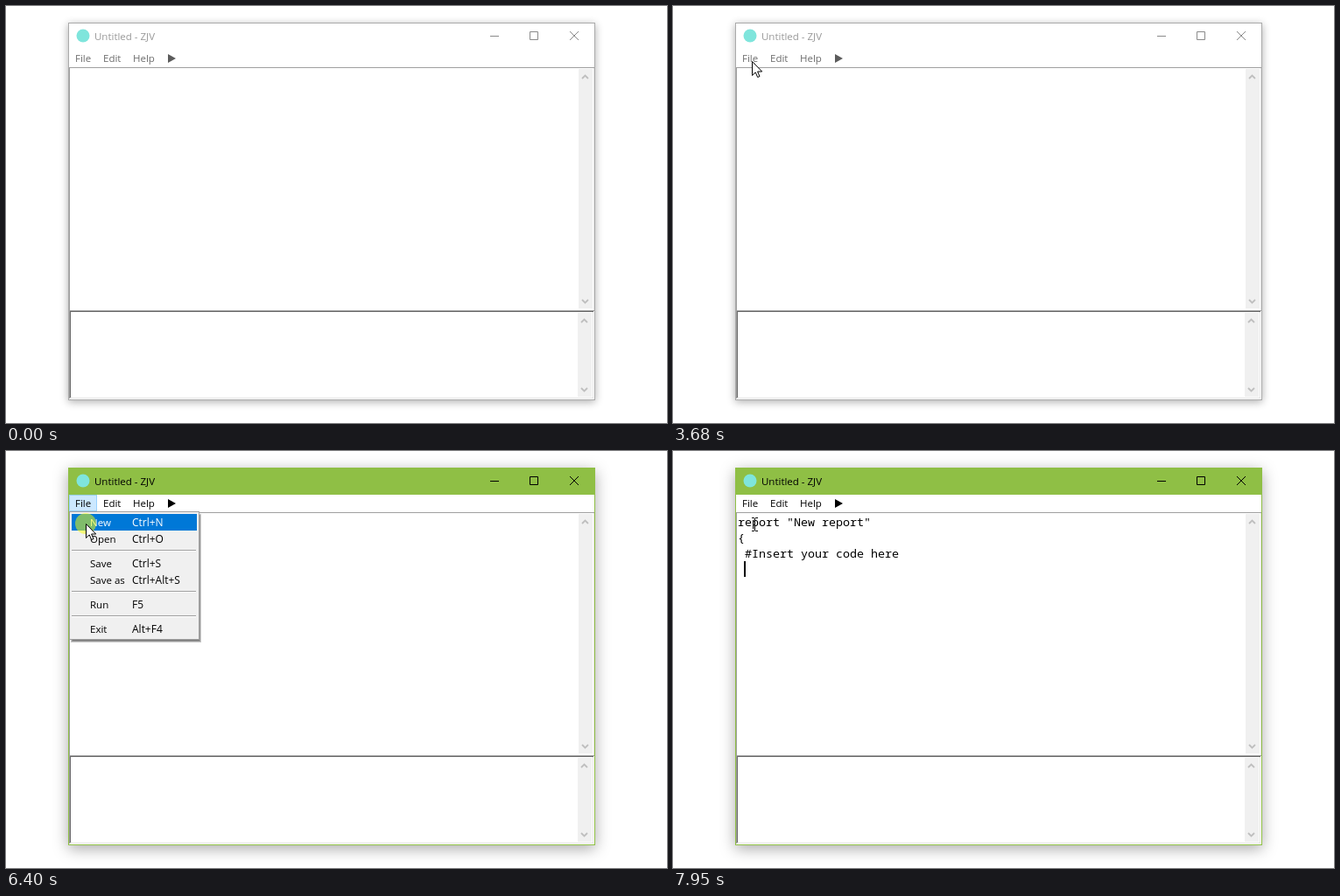
Recreate the animation shown at these times as an HTML page. Size 755x477 px, loop 8000 ms.

```html
<!DOCTYPE html>
<html lang="en">
<head>
<meta charset="utf-8">
<title>Editor demo</title>
<style>
html, body { margin: 0; width: 100%; height: 100%; overflow: hidden; background: #fff; }
#win, #win * { box-sizing: border-box; }
#win { position: absolute; left: 71px; top: 19px; width: 602px; height: 432px; background: #fff;
  box-shadow: 0 2px 9px rgba(0,0,0,.32); }
#win.active { box-shadow: 0 4px 16px rgba(0,0,0,.34); }
svg { position: absolute; left: 0; top: 0; display: block; }
text { font: 11.5px "Open Sans", "Noto Sans", sans-serif; white-space: pre; }
.keys text { font-size: 12px; }
#code text { font: 13.33px "Noto Sans Mono", "DejaVu Sans Mono", monospace; }
rect { shape-rendering: crispEdges; }
.title { fill: #999; }
.icon { stroke: #8a8a8a; fill: none; }
.bar { fill: #6d6d6d; }
.play { fill: #5c5c5c; }
.frame { fill: none; stroke: #aaa; shape-rendering: crispEdges; }
.caption { fill: #fff; }
.active .title, .active .bar, .active .play { fill: #000; }
.active .icon { stroke: #000; }
.active .frame { stroke: #8fbf45; }
.active .caption { fill: #8fbf45; }
</style>
</head>
<body>
<div id="win"></div>
<svg id="stage" width="755" height="477" viewBox="0 0 755 477">
  <rect class="caption" x="72" y="20" width="600" height="30"/>
  <rect class="frame" x="71.5" y="19.5" width="601" height="431"/>
  <circle cx="88" cy="34" r="7.5" fill="#7fe5dc"/>
  <text class="title" x="101" y="39">Untitled - ZJV</text>
  <path class="icon" d="M553 34.5h10M598.5 29.5h9v9h-9zM644 29l10 10M654 29l-10 10"/>

  <g id="hot"><rect x="72.5" y="50.5" width="31" height="18" fill="#cce8ff" stroke="#99d1ff"/></g>
  <g class="bar">
    <text x="79" y="64">File</text><text x="111" y="64">Edit</text><text x="145" y="64">Help</text>
  </g>
  <path class="play" d="M185 55l9 5-9 5z"/>

  <g id="panes"></g>

  <g id="code">
    <text x="74" y="86">report "New report"</text>
    <text x="74" y="104">{</text>
    <text x="82" y="122">#Insert your code here</text>
  </g>
  <rect id="caret" x="81" y="126" width="2" height="18"/>

  <g id="menu"></g>
  <g id="pick">
    <rect x="75" y="72" width="143" height="19" fill="#0078d7"/>
    <g fill="#fff"><text x="96" y="86">New</text><g class="keys"><text x="144" y="86">Ctrl+N</text></g></g>
  </g>

  <circle id="click" r="12" fill="#ff0" fill-opacity=".5"/>
  <path id="arrow" d="M.5.5v16l3.7-3.6 2.5 5.6 2.3-1-2.4-5.5h5.1z" fill="#fff" stroke="#000"/>
  <path id="beam" d="M-3-7.5h3M1-7.5h3M.5-7v14M-3 7.5h3M1 7.5h3" stroke="#000" shape-rendering="crispEdges"/>
</svg>
<script>
const LOOP = 8000;
const $ = id => document.getElementById(id);
const rect = (x, y, w, h, fill) =>
  `<rect x="${x}" y="${y}" width="${w}" height="${h}" fill="${fill}"/>`;
const label = (x, y, s) => `<text x="${x}" y="${y}">${s}</text>`;

// Scroll bar with a chevron at each end
const scrollbar = (x, y, h, up, down) => {
  const mid = x + 7.5;
  return rect(x, y, 16, h, '#f0f0f0') +
    `<path d="M${mid - 3.5} ${up + 2}l3.5-3.5 3.5 3.5M${mid - 3.5} ${down - 2}l3.5 3.5 3.5-3.5"
      fill="none" stroke="#bfbfbf" stroke-width="1.8"/>`;
};

$('panes').innerHTML =
  rect(72, 70, 600, 1, '#a0a0a0') + rect(72, 70, 1, 278, '#a0a0a0') +
  rect(671, 71, 1, 277, '#e3e3e3') +
  rect(72, 348, 600, 1, '#a0a0a0') + rect(73, 349, 598, 1, '#696969') +
  rect(72, 348, 1, 101, '#a0a0a0') + rect(73, 349, 1, 99, '#696969') +
  rect(670, 350, 1, 98, '#e3e3e3') + rect(74, 448, 597, 1, '#e3e3e3') +
  scrollbar(654, 72, 274, 81, 338) + scrollbar(653, 351, 96, 360, 439);

const items = [
  [86, 'New', 'Ctrl+N'], [105, 'Open', 'Ctrl+O'], [133, 'Save', 'Ctrl+S'],
  [152, 'Save as', 'Ctrl+Alt+S'], [180, 'Run', 'F5'], [208, 'Exit', 'Alt+F4']
];
$('menu').innerHTML =
  [1, 2, 3].map(i => `<rect x="${77 - i}" y="${75 - i}" width="${143 + 2 * i}" height="${141 + 2 * i}"
    rx="1" fill="#000" fill-opacity=".22"/>`).join('') +
  rect(72, 69, 149, 147, '#a0a0a0') + rect(73, 70, 147, 145, '#f0f0f0') +
  [113, 160, 188].map(y => rect(75, y, 142, 1, '#a0a0a0') + rect(75, y + 1, 142, 1, '#fff')).join('') +
  items.map(([y, name]) => label(96, y, name)).join('') +
  '<g class="keys">' + items.map(([y, , key]) => label(144, y, key)).join('') + '</g>';

// Pointer moves: first step, last step, step count, target, easing
const linear = p => p;
const smooth = p => p * p * (3 - 2 * p);
const moves = [
  [1260, 1290, 2, 452, 225, linear],
  [2070, 2070, 1, 449, 225, linear],
  [2150, 2610, 7, 249, 169, smooth],
  [2910, 3680, 11, 90, 63, smooth],
  [5320, 5780, 7, 91, 83, linear],
  [6630, 6630, 1, 93, 84, linear]
];

function pointer(t) {
  let x = 462, y = 241;
  for (const [from, to, n, tx, ty, ease] of moves) {
    if (t < from) break;
    const gap = (to - from) / (n - 1 || 1) || 1;
    const p = ease(Math.min(n, Math.floor((t - from) / gap + 1e-6) + 1) / n);
    x = Math.round(x + (tx - x) * p);
    y = Math.round(y + (ty - y) * p);
  }
  return [x, y];
}

const within = (t, a, b) => t >= a && t < b;
const show = (id, on) => { $(id).style.display = on ? '' : 'none'; };
const place = (id, x, y) => $(id).setAttribute('transform', `translate(${x} ${y})`);

// The chosen menu item lingers and fades in steps
function pickOpacity(t, y) {
  if (within(t, 5320, 6550)) return y >= 72 ? 1 : 0;
  if (within(t, 6550, 6870)) return [.8, .56, .32, .085][Math.floor((t - 6550) / 80)];
  return 0;
}

function draw(t) {
  const [x, y] = pointer(t);
  const active = t >= 4300;
  const beam = y > 70 && !within(t, 4300, 6630);
  $('win').classList.toggle('active', active);
  $('stage').classList.toggle('active', active);
  show('hot', within(t, 4300, 6550));
  show('menu', within(t, 4380, 6550));
  $('pick').style.opacity = pickOpacity(t, y);
  show('click', within(t, 4300, 4460) || within(t, 6400, 6550));
  show('code', t >= 6630);
  show('caret', within(t, 7020, 7650) || t >= 7950);
  show('beam', t >= 910 && beam);
  show('arrow', t >= 910 && !beam);
  for (const id of ['beam', 'arrow', 'click']) place(id, x, y);
}

function tick() {
  draw(performance.now() % LOOP);
  requestAnimationFrame(tick);
}
tick();
</script>
</body>
</html>
```
